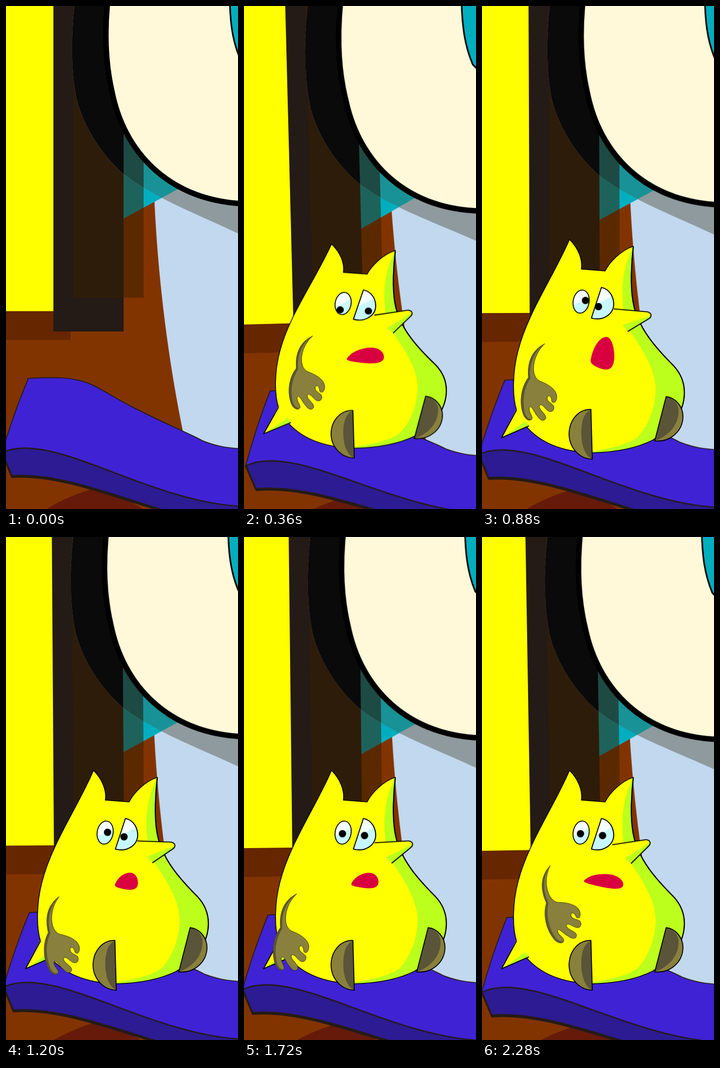
An HTML page for the animation above (2.32 s loop, 509x1101 px).

```html
<!DOCTYPE html>
<html lang="en">
<head>
<meta charset="utf-8">
<title>Sofa</title>
<style>
  html, body { margin: 0; width: 100%; height: 100%; overflow: hidden; background: #823400; }
  svg { display: block; width: 100%; height: 100%; }

  .move { animation: 2320ms linear infinite; }
  #room { transform-origin: 1130px 510px; animation-name: tilt; }
  #creature { transform-origin: 0 744px; animation-name: land; }
  #nose { transform-origin: 332px 682px; animation-name: sniff; }
  #arm { transform-origin: 151px 721px; animation-name: gesture; }
  #mouth { transform-box: fill-box; transform-origin: center; animation-name: talk; }
  #leftPupil { animation-name: lookLeft; }
  #rightPupil { animation-name: lookRight; }
  #leftLeg { --dx: 0px; --dy: 8.5px; animation-name: bump; }
  #rightLeg { --dx: -5.5px; --dy: 4px; animation-name: bump; }

  @keyframes tilt {
    0%, 10.34%, 20.69% { transform: rotate(0deg); }
    15.52% { transform: rotate(-1.49deg); }
    100% { transform: rotate(-.98deg); }
  }
  @keyframes land {
    0%, 8.61% { opacity: 0; transform: translateY(-700px) scaleY(1); }
    8.62% { opacity: 1; transform: translateY(-700px) scaleY(1); }
    13.79%, 20.69%, 100% { opacity: 1; transform: translateY(0) scaleY(1); }
    15.52% { transform: translateY(0) scaleY(.957); }
  }
  @keyframes bump {
    0%, 13.79%, 20.69%, 100% { transform: translate(0, 0); }
    15.52% { transform: translate(var(--dx), var(--dy)); }
  }
  @keyframes sniff {
    0%, 15.52%, 100% { transform: rotate(-16.6deg); }
    20.69%, 25.86% { transform: rotate(0deg); }
  }
  @keyframes gesture {
    0%, 25.86% { transform: translate(0, 0) rotate(0deg); }
    37.93% { transform: translate(-13px, 18px) rotate(0deg); }
    51.72% { transform: translate(-34px, 66px) rotate(-9deg); }
    74.14% { transform: translate(-35px, 60px) rotate(0deg); }
    98.28%, 100% { transform: translate(-1px, -2px) rotate(-20deg); }
  }
  @keyframes talk {
    0%, 15.52% { transform: translate(1px, 14px) scale(1.37, 1.06) skewY(0deg); }
    25.86% { transform: translate(0, 2.5px) scale(1.03, .92) skewY(0deg); }
    37.93% { transform: translate(-1px, 8px) scale(.87, 2.1) skewY(0deg); }
    51.72% { transform: translate(-1px, 1.5px) scale(.85, 1.1) skewY(0deg); }
    74.14% { transform: translate(0, 0) scale(1) skewY(0deg); }
    98.28%, 100% { transform: translate(1.5px, 0) scale(1.45, .9) skewY(12deg); }
  }
  @keyframes lookLeft {
    0%, 15.52% { transform: translate(211px, 661.5px); }
    25.86% { transform: translate(222.5px, 651px); }
    37.93% { transform: translate(227px, 644.5px); }
    74.14%, 100% { transform: translate(216px, 649.5px); }
  }
  @keyframes lookRight {
    0%, 15.52% { transform: translate(273px, 664.5px); }
    25.86% { transform: translate(265px, 632px); }
    37.93% { transform: translate(255.5px, 658px); }
    74.14%, 100% { transform: translate(264.5px, 653.5px); }
  }
</style>
</head>
<body>
<svg viewBox="0 0 509 1101" preserveAspectRatio="none">
  <defs>
    <clipPath id="shadowClip">
      <path d="M155-40C140 60 142 160 158 215C178 278 215 330 258 368C335 426 425 457 509 498L620 550V-40Z"/>
    </clipPath>
    <path id="bodyShape" d="M192 511C211 530 221 554 218 576L270 580C280 561 304 535 332 526C328 560 325 610 331 645C340 705 386 753 420 787C434 802 444 822 444 846C444 885 420 925 375 950C335 970 290 977 241 978C185 976 132 961 97 920L76 885C66 855 67 800 79 755C100 672 158 590 192 511Z"/>
    <clipPath id="bodyClip"><use href="#bodyShape"/></clipPath>
    <path id="rightEye" d="M262 616C281 620 289 638 289 653C288 676 264 690 240 683Z"/>
    <clipPath id="rightEyeClip"><use href="#rightEye"/></clipPath>
    <ellipse id="leftEye" cx="217.5" cy="647" rx="17.5" ry="25.5" transform="rotate(10 217.5 647)"/>
    <clipPath id="leftEyeClip"><use href="#leftEye"/></clipPath>
    <path id="leftFoot" d="M239 883C212 882 191 906 191 938C192 968 214 991 242 992Z"/>
    <path id="rightFoot" d="M404 855C425 857 441 877 441 899C440 932 412 955 379 952Z"/>
  </defs>

  <g id="room" class="move">
    <path fill="#823400" d="M-100-100H700V1250H-100Z"/>
    <path fill="#662600" d="M-100-100H141.500V731H-100Z"/>
    <path fill="#ff0" d="M-100-100H105V668H-100Z"/>
    <path fill="#c2d8ee" d="M325 410C331 560 350 750 391 945L620 1000V350Z"/>
    <path fill="#00aec0" d="M258 200H420V378L258 465Z"/>
    <path fill="#241a16" d="M104-100H258V712.500H104Z"/>
    <path fill="#382000" fill-opacity=".52" d="M148-100H302V638.500H148Z"/>
    <g clip-path="url(#shadowClip)">
      <path fill="#8e9a9e" d="M0-100H700V700H0Z"/>
      <path fill="#189296" d="M302-100H420V378L302 441Z"/>
      <path fill="#1e4a44" d="M258-100H302V500H258Z"/>
      <path fill="#0a0a0a" d="M0-100H258V500H0Z"/>
    </g>
    <path fill="#fff9d9" stroke="#000" stroke-width="12" d="M231-70C215 25 215 110 232 185C258 320 356 424 520 433L700 420V-70Z"/>
    <path fill="#00aebe" stroke="#000" stroke-width="3.500" d="M491-40C490 30 496 72 512 112L640 250V-40Z"/>
    <path fill="#651a0a" d="M55 1125C100 1090 150 1066 215 1050L400 1160H55Z"/>
    <g stroke="#241a16">
      <path fill="#3f22d4" stroke-width="2" d="M49 815C110 812 150 812 186 828C215 840 240 861 300 889C360 919 405 937 432 952C460 963 482 967 515 969L640 980V1105H515L-9 978C8 920 29 863 49 815Z"/>
      <path fill="#2c1b92" stroke="none" d="M-9 978C30 958 95 970 160 993C260 1027 390 1089 515 1095H640V1220L335 1102C235 1072 110 1022 13 1030Z"/>
      <path fill="none" stroke-width="3" d="M-9 978C30 958 95 970 160 993C260 1027 390 1089 515 1095H640"/>
      <path fill="none" stroke-width="4" d="M-9 976L13 1031"/>
      <path fill="none" stroke-width="6.500" d="M12 1030C110 1022 235 1072 335 1102L520 1172"/>
    </g>
  </g>

  <g id="creature" class="move" stroke-linejoin="round">
    <use href="#bodyShape" fill="#ff0"/>
    <path fill="#bcff1c" clip-path="url(#bodyClip)" d="M332 526C306 575 305 630 311 672L320 703C338 734 380 785 381 838C381 875 366 920 340 945C315 962 280 968 241 975V990H470V760L345 640Z"/>
    <use href="#bodyShape" fill="none" stroke="#000" stroke-width="1.700"/>
    <path fill="none" stroke="#000" stroke-width="2.500" d="M332 526C328 560 325 610 331 645C340 705 386 753 420 787C434 802 444 822 444 846C444 885 420 925 375 950"/>
    <path fill="#ff0" d="M75 883L43 945L104 919L110 900Z"/>
    <path fill="#bcff1c" d="M43 945L95 909L104 919Z"/>
    <path fill="none" stroke="#000" stroke-width="2" d="M76 884L43 945L103 919"/>

    <use href="#leftEye" fill="#f6ffff"/>
    <path fill="#c8f8ff" clip-path="url(#leftEyeClip)" d="M190 655C212 655 224 642 242 632V690H190Z"/>
    <use href="#leftEye" fill="none" stroke="#000" stroke-width="2"/>
    <use href="#rightEye" fill="#f6ffff"/>
    <path fill="#c8f8ff" clip-path="url(#rightEyeClip)" d="M235 658C260 652 274 640 295 631V695H235Z"/>
    <use href="#rightEye" fill="none" stroke="#000" stroke-width="2.200"/>
    <circle id="leftPupil" class="move" r="8"/>
    <circle id="rightPupil" class="move" r="8"/>

    <g id="nose" class="move">
      <path fill="#ff0" d="M290 661L364 671Q373 675 370 683L318 712L309 697L296 690Z"/>
      <path fill="#bcff1c" d="M308 697L370 680Q370 684 366 686L318 712Z"/>
      <path fill="none" stroke="#000" stroke-width="2.200" d="M290 661L364 671Q372 674 371 680Q370 684 366 686L318 712"/>
    </g>
    <path id="mouth" class="move" fill="#d9003f" d="M236 758C244 742 262 735 275 735C287 735 296 745 295 757C293 773 268 770 245 765C237 763 234 761 236 758Z"/>

    <g id="arm" class="move">
      <path fill="#88803c" stroke="#2c2810" stroke-width="1" d="M151 721C122 735 112 763 115 795C98 817 95 850 103 874C108 889 119 892 123 885C124 878 114 868 117 861C122 854 127 872 135 880C142 891 150 891 153 884C154 874 136 865 139 856C145 850 152 866 160 869C168 872 173 864 170 857C166 851 155 848 156 839C160 830 166 838 166 847C171 855 178 846 177 835C175 819 154 808 140 803C117 792 124 745 151 721Z"/>
      <path fill="#5a5438" d="M151 721C122 735 112 763 115 795C98 817 95 850 103 874C108 889 119 892 123 885C116 888 110 882 107 872C101 845 105 818 119 797C116 765 127 738 151 721Z"/>
    </g>

    <g id="leftLeg" class="move">
      <use href="#leftFoot" fill="#88803c"/>
      <path fill="#5a5438" d="M239 884C222 890 217 914 218 940C219 966 228 986 242 992Z"/>
      <use href="#leftFoot" fill="none" stroke="#000" stroke-width="2"/>
    </g>
    <g id="rightLeg" class="move">
      <use href="#rightFoot" fill="#88803c"/>
      <path fill="#5a5438" d="M404 855C424 860 433 874 431 892C429 919 408 942 379 952Z"/>
      <use href="#rightFoot" fill="none" stroke="#000" stroke-width="2"/>
    </g>
  </g>
</svg>
</body>
</html>
```
